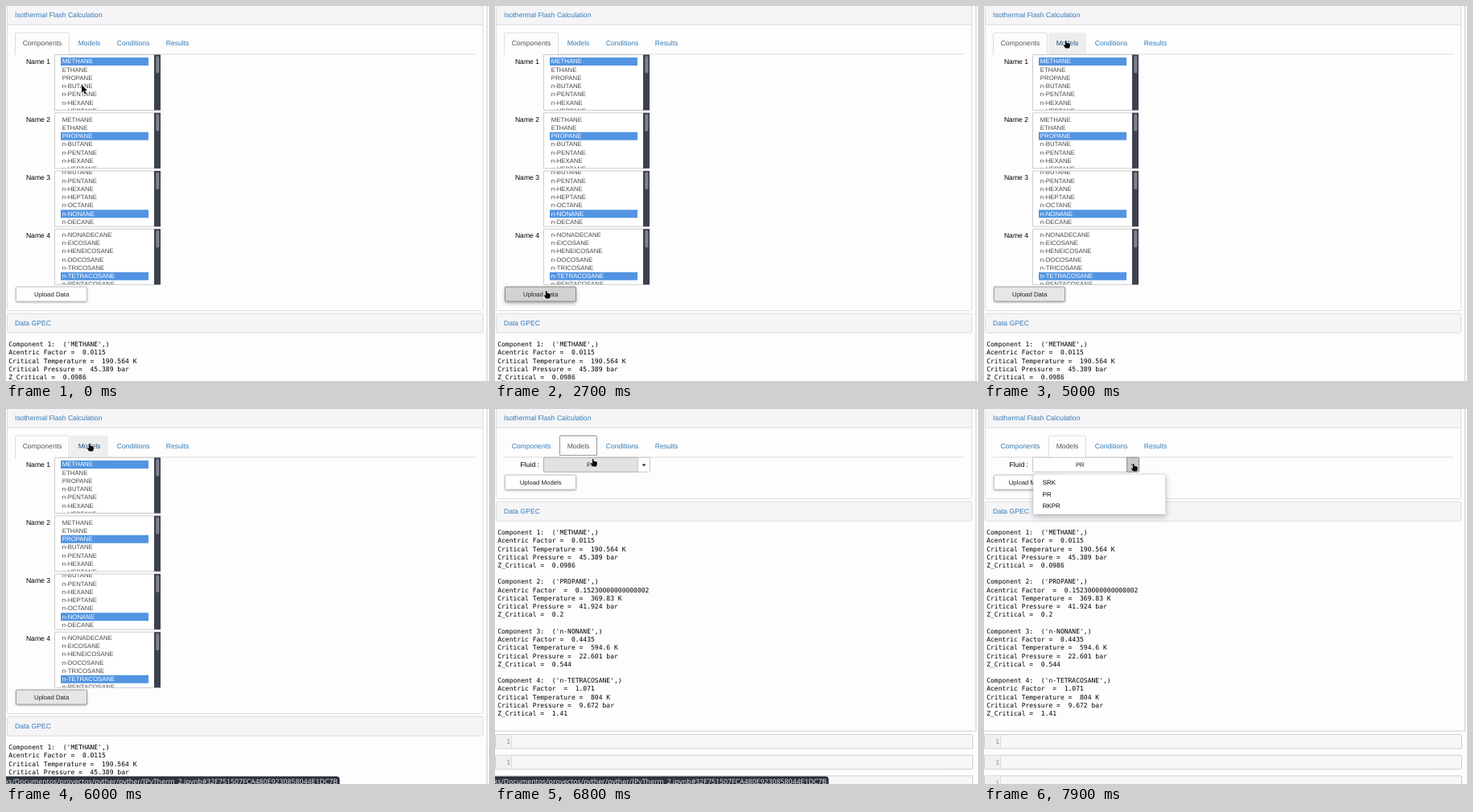
An HTML page with a canvas that plays this animation: 600 by 466 pixels, repeating every 8 s.

```html
<!DOCTYPE html>
<html lang="en">
<head>
<meta charset="utf-8">
<title>Isothermal Flash Calculation</title>
<style>
html, body { margin: 0; width: 100%; height: 100%; overflow: hidden; background: #fdfdfd; }
canvas { display: block; width: 600px; height: 466px; }
</style>
</head>
<body>
<canvas id="stage" width="600" height="466"></canvas>
<script>
const ctx = document.getElementById('stage').getContext('2d');
const LOOP = 8000, STEP = 100;
const SANS = '"Liberation Sans", Arial, sans-serif';
const MONO = '"DejaVu Sans Mono", monospace';
const NOTO = '"Noto Sans", sans-serif';
const PAGE = '#fdfdfd', LINK = '#337ab7', LINE = '#dddddd';
const ROW = 10.25;

const TABS = [
  { label: 'Components', x: 11.5, w: 67 },
  { label: 'Models', x: 80.5, w: 46 },
  { label: 'Conditions', x: 128.5, w: 59 },
  { label: 'Results', x: 189.5, w: 47 }
];

const LISTS = [
  { y: 60, first: 69, pick: 0, items: 'METHANE ETHANE PROPANE n-BUTANE n-PENTANE n-HEXANE n-HEPTANE' },
  { y: 132.3, first: 141.2, pick: 2, items: 'METHANE ETHANE PROPANE n-BUTANE n-PENTANE n-HEXANE n-HEPTANE' },
  { y: 204.5, first: 207, pick: 5, items: 'n-BUTANE n-PENTANE n-HEXANE n-HEPTANE n-OCTANE n-NONANE n-DECANE' },
  { y: 276.7, first: 284.5, pick: 5, items: 'n-NONADECANE n-EICOSANE n-HENEICOSANE n-DOCOSANE n-TRICOSANE n-TETRACOSANE n-PENTACOSANE' }
];

const OUTPUT = [
  ['METHANE', '=  0.0115', '190.564', '45.389', '0.0986'],
  ['PROPANE', ' =  0.15230000000000002', '369.83', '41.924', '0.2'],
  ['n-NONANE', '=  0.4435', '594.6', '22.601', '0.544'],
  ['n-TETRACOSANE', ' =  1.071', '804', '9.672', '1.41']
].flatMap(([name, factor, temp, press, z], i) => [
  `Component ${i + 1}:  ('${name}',)`,
  `Acentric Factor ${factor}`,
  `Critical Temperature =  ${temp} K`,
  `Critical Pressure =  ${press} bar`,
  `Z_Critical =  ${z}`,
  ''
]);

const STATUS = 'ks/Documentos/proyectos/pyther/pyther/IPyTherm_2.ipynb#32F751507FCA480E9230858044E1DC7B';

// time, x, y of the pointer tip
const PATH = [
  [0, 94, 98], [400, 94, 98], [500, 94, 97.5], [800, 94, 97.5], [1000, 88, 95], [1200, 86, 91],
  [1400, 95, 88.5], [1500, 101, 140], [1600, 109, 245], [1700, 113, 328], [1800, 104, 341],
  [2000, 80, 352], [2300, 64, 354], [3900, 64, 354], [4100, 78, 326], [4300, 120, 215],
  [4500, 160, 115], [4600, 152, 78], [4700, 120, 58], [4800, 104, 45], [5000, 102, 43],
  [5200, 104, 43], [6400, 104, 43], [6600, 112, 52], [6800, 122, 62], [7000, 139, 57],
  [7200, 170, 63], [7400, 185, 68], [7800, 185, 67], [7900, 186, 68]
];

const clamp = v => Math.max(0, Math.min(1, v));
const ramp = (t, a, b) => clamp((t - a) / (b - a));
const gray = v => { v = Math.round(v); return `rgb(${v},${v},${v})`; };
const inside = (p, x, y, w, h) => p.x >= x && p.x < x + w && p.y >= y && p.y < y + h;

function pointerAt(t) {
  let i = 1;
  while (i < PATH.length - 1 && PATH[i][0] < t) i++;
  const [t0, x0, y0] = PATH[i - 1], [t1, x1, y1] = PATH[i];
  const k = ramp(t, t0, t1);
  return { x: x0 + (x1 - x0) * k, y: y0 + (y1 - y0) * k };
}

// text centred vertically on y
function text(s, x, y, size, color, align = 'left', face = SANS) {
  ctx.font = `${size}px ${face}`;
  ctx.fillStyle = color;
  ctx.textAlign = align;
  ctx.fillText(s, x, y + size * (face === SANS ? 0.31 : 0.35));
}

function box(x, y, w, h, fill, stroke, radius = 0) {
  ctx.beginPath();
  ctx.roundRect(x, y, w, h, radius);
  if (fill) { ctx.fillStyle = fill; ctx.fill(); }
  if (stroke) { ctx.strokeStyle = stroke; ctx.lineWidth = 1; ctx.stroke(); }
}

function rule(x, y, w, h, color = LINE) {
  ctx.fillStyle = color;
  ctx.fillRect(x, y, w, h);
}

function withShadow(blur, dy, alpha, draw) {
  ctx.save();
  ctx.shadowColor = `rgba(0,0,0,${alpha})`;
  ctx.shadowBlur = blur;
  ctx.shadowOffsetY = dy;
  draw();
  ctx.restore();
}

function button(label, y, focus, press) {
  const fill = gray(254 - 24 * focus - 20 * press);
  withShadow(3 + 2 * press, 1 + press, 0.4, () => box(12.5, y, 88, 18, fill, null, 1));
  box(12.5, y, 88, 18, fill, gray(196 - 36 * focus - 20 * press), 1);
  text(label, 56.7, y + 9.2, 7.8, '#222', 'center');
}

function heading(label, y) {
  box(1.5, y, 591, 24, '#f5f4f6', LINE, 2);
  text(label, 11, y + 12, 8.6, LINK);
}

function tabs(active, hovered, focused) {
  rule(11, 59.4, 572, 1);
  TABS.forEach((tab, i) => {
    if (i === active) {
      box(tab.x, 33.2, tab.w, 27, PAGE, LINE, [2, 2, 0, 0]);
      rule(tab.x + 0.5, 59, tab.w - 1, 2, PAGE);
      if (focused) box(tab.x, 33.2, tab.w, 24.3, null, '#9a9a9a', 1);
    } else if (i === hovered) {
      box(tab.x - 0.5, 33, tab.w + 1, 26, '#eeeeee', null, [2, 2, 0, 0]);
    }
    const color = i === active ? '#555' : i === hovered ? '#23527c' : LINK;
    text(tab.label, tab.x + tab.w / 2, 46, 8.6, color, 'center');
  });
}

function listBox(list, index) {
  const { y, first, pick } = list;
  text(`Name ${index + 1}`, 55, index * 72.2 + 69, 8.6, '#000', 'right');
  box(60.5, y + 0.5, 131, 69, '#fff', '#cccccc');
  ctx.save();
  ctx.beginPath();
  ctx.rect(61, y + 1, 131, 68);
  ctx.clip();
  list.items.split(' ').forEach((name, i) => {
    const cy = first + i * ROW;
    if (i === pick) rule(68, cy - 5, 109, 10, '#5294e2');
    text(name, 69.8, cy, 7.8, i === pick ? '#fff' : '#484848');
  });
  ctx.restore();
  rule(184, y + 0.5, 8, 69, '#3c414e');
  box(186.3, y + 2, 4, 21.5, '#7d818b', null, 2);
}

function componentsPage(t) {
  LISTS.forEach(listBox);
  const press = t < 3300 ? ramp(t, 2400, 2700) : 0;
  button('Upload Data', 349, ramp(t, 0, 300), press);
}

function caret(x, y) {
  ctx.fillStyle = '#222';
  ctx.beginPath();
  ctx.moveTo(x - 2.5, y);
  ctx.lineTo(x + 2.5, y);
  ctx.lineTo(x, y + 2.6);
  ctx.fill();
}

function modelsPage(mouse, open) {
  const overMain = inside(mouse, 60, 60, 118, 19);
  const overToggle = inside(mouse, 178, 60, 15, 19);
  text('Fluid :', 55, 69, 8.6, '#000', 'right');
  box(60.5, 60.2, 117, 18, overMain ? '#e2e2e2' : '#fefefe', overMain ? '#adadad' : '#c8c8c8', [1, 0, 0, 1]);
  const dark = open ? '#c8c8c8' : '#e6e6e6';
  box(177.5, 60.2, 15, 18, overToggle ? dark : '#fefefe', overToggle ? '#8c8c8c' : '#c8c8c8', [0, 1, 1, 0]);
  text('PR', 119.3, 69.7, 7.8, '#222', 'center');
  caret(185, 68.6);
  button('Upload Models', 82, 0, 0);
}

function menu(alpha) {
  ctx.globalAlpha = alpha;
  withShadow(7, 3, 0.25, () => box(61, 81, 164.5, 50, '#fff'));
  box(61, 81, 164.5, 50, '#fff', 'rgba(0,0,0,.12)', 1);
  ['SRK', 'PR', 'RKPR'].forEach((s, i) => text(s, 72.7, 91.3 + i * 14.75, 7.95, '#000'));
  ctx.globalAlpha = 1;
}

function inputCell(y) {
  box(0.5, y, 593, 17.5, '#f7f6f8', '#cfcfcf', 1);
  rule(1, y + 0.5, 19, 16.5, '#f0eff1');
  rule(20, y, 1, 17.5);
  text('1', 19, y + 9, 8, '#8c8c8c', 'right', MONO);
}

function statusBar(alpha) {
  if (alpha <= 0) return;
  ctx.globalAlpha = alpha;
  box(-4, 457, 418, 20, '#2f343f', '#23272f', 3);
  text(STATUS, 412, 463.4, 8.75, '#e0e5ec', 'right', NOTO);
  ctx.globalAlpha = 1;
}

function shape(points, x, y) {
  ctx.beginPath();
  for (let i = 0; i < points.length; i += 2) ctx.lineTo(x + points[i], y + points[i + 1]);
  ctx.closePath();
  ctx.lineJoin = 'round';
  ctx.strokeStyle = 'rgba(255,255,255,.85)';
  ctx.lineWidth = 1.2;
  ctx.stroke();
  ctx.fillStyle = '#0a0a0a';
  ctx.fill();
}

const ARROW = [0, 0, 0, 9.6, 2.2, 7.6, 3.9, 11.5, 5.6, 10.7, 4, 7, 7, 7];
const HAND = [-1.2, 0, 0.3, 0, 0.6, 2.8, 2.6, 2.9, 4.6, 3.8, 5, 5.8, 4.1, 9.6,
  -0.8, 9.6, -3.4, 5.8, -2.7, 5, -1.2, 6];

function draw(t) {
  const mouse = pointerAt(t);
  const models = t >= 6200;
  const open = t >= 7600;
  const hovered = TABS.findIndex(tab => inside(mouse, tab.x, 33, tab.w, 26));
  const shift = models ? -267 : 0;

  rule(0, 0, 600, 466, PAGE);
  rule(597, 0, 1, models ? 400 : 466, '#cfcfcf');

  box(1.5, -6, 591, 384.5 + shift, PAGE, LINE, 2);
  heading('Isothermal Flash Calculation', -0.7);
  tabs(models ? 1 : 0, hovered, models && !open);
  models ? modelsPage(mouse, open) : componentsPage(t);

  heading('Data GPEC', 382.2 + shift);
  OUTPUT.forEach((s, i) => text(s, 3.2, 420.3 + shift + i * 10.23, 8.03, '#000', 'left', MONO));
  if (models) {
    rule(0, 399.7, 598, 1, '#cfcfcf');
    for (let i = 0; i < 3; i++) inputCell(404.5 + i * 25.7);
  }
  if (open) menu(t < 7700 ? 0.6 : 1);
  statusBar(t < 7000 ? ramp(t, 5000, 5200) : 0);

  const clickable = hovered >= 0 ||
    (models ? inside(mouse, 60, 60, 133, 19) : inside(mouse, 12, 349, 89, 19));
  shape(clickable ? HAND : ARROW, mouse.x, mouse.y);
}

const start = performance.now();
function tick() {
  const t = (performance.now() - start) % LOOP;
  ctx.textRendering = 'geometricPrecision';
  draw(Math.floor(t / STEP) * STEP);
  requestAnimationFrame(tick);
}
tick();
</script>
</body>
</html>
```
